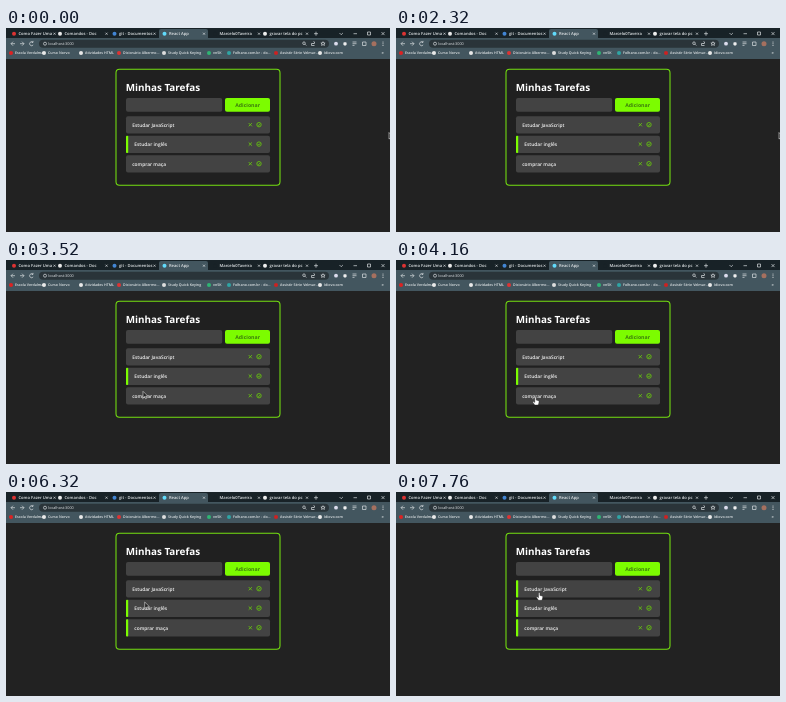
An HTML page that plays this animation: 384 by 204 pixels, repeating every 8 s.

```html
<!DOCTYPE html>
<html lang="pt-BR">
<head>
<meta charset="utf-8">
<title>Minhas Tarefas</title>
<style>
  html, body { margin: 0; width: 100%; height: 100%; overflow: hidden; background: #222; }
  svg { display: block; width: 100vw; height: 100vh; }
  text { font: 600 4.1px "Open Sans", "Noto Sans", sans-serif; fill: #e2e6e8; text-rendering: geometricPrecision; white-space: pre; }
  .url { font-size: 3.8px; font-weight: 400; }
  .bookmark { font-size: 3.6px; }
  .title { font-size: 9.9px; font-weight: 700; fill: #fff; }
  .button { font-size: 5.2px; font-weight: 700; fill: #3d7d0d; text-anchor: middle; }
  .task { font-size: 4.85px; fill: #f4f4f4; }
  .line { fill: none; stroke: #d8dde0; stroke-width: .7; }
  .lime { fill: none; stroke: #66c010; stroke-width: .9; }
  .arrow { fill: #222; stroke: #ddd; stroke-width: .6; }
  .hand { fill: #fff; stroke: #222; stroke-width: .4; stroke-linejoin: round; }
</style>
</head>
<body>
<svg id="stage" viewBox="0 0 384 204"></svg>
<script>
const LIME = '#7cfc00', TOOLBAR = '#43565f';
const stage = document.getElementById('stage');

const rect = (x, y, w, h, fill, r = 0, extra = '') =>
  `<rect x="${x}" y="${y}" width="${w}" height="${h}" rx="${r}" fill="${fill}" ${extra}/>`;
const dot = (x, y, r, fill) => `<circle cx="${x}" cy="${y}" r="${r}" fill="${fill}"/>`;
const label = (x, y, text, cls = '') => `<text x="${x}" y="${y}" class="${cls}">${text}</text>`;
const line = (d, cls = 'line') => `<path d="${d}" class="${cls}"/>`;
const cross = (x, y, r, cls) => line(`M${x - r} ${y - r}l${2 * r} ${2 * r}m0 ${-2 * r}l${-2 * r} ${2 * r}`, cls);

function browser() {
  const tabs = [
    [8, 'Como Fazer Uma', '#d33'], [54, 'Comandos - Doc', '#e8e8e8'], [108.5, 'git - Documentos', '#4285d4'],
    [158.5, 'React App', '#61dafb'], [209, 'Marcelo0Taveira', '#182227'], [259, 'gravar tela do pc', '#eee']
  ];
  const bookmarks = [
    [5, 'Escola Verdalma', '#d22'], [38, 'Curso Norvo', '#e8e8e8'], [75, 'Atividades HTML', '#e8e8e8'],
    [113, 'Dicionário Albermo...', '#d33'], [158, 'Study Quick Keying', '#ddd'], [203, 'vn5K', '#2fb573'],
    [223, 'Folhano.com.br - do...', '#2fa5a5'], [270, 'Assistir Série Velmar...', '#c22'], [314, 'Idiovo.com', '#e8e8e8']
  ];
  return rect(0, 0, 384, 11, '#182227') + rect(153, 1, 49, 11, TOOLBAR, 2) +
    rect(0, 10, 384, 21, TOOLBAR) + rect(33, 11.7, 290, 8, '#2a3439', 4) +
    tabs.map(([x, text, color]) => dot(x, 5.7, 2, color) + label(x + 4.5, 7.2, text)).join('') +
    [48.5, 100.5, 148.5, 198, 253, 301].map(x => cross(x, 5.7, 1)).join('') +
    line('M308 5.7h4m-2 -2v4M333.5 5l1.7 1.7l1.7 -1.7M347.5 5.7h3.5M361.5 4h3v3h-3z') + cross(377, 5.6, 1.5) +
    line('M9 15.7h-4m2 -2l-2 2l2 2M14 15.7h4m-2 -2l2 2l-2 2M27 14.3a2 2 0 1 0 .2 2.6m-.2 -4v1.5h-1.5') +
    `<circle cx="39" cy="15.7" r="1.5" class="line"/>` + label(42.2, 17.2, 'localhost:3000', 'url') +
    `<circle cx="298" cy="15.2" r="1.3" class="line"/>` + line('M299 16.2l1.3 1.3M308.5 15.5h-3v2h3m-1 -4l1.5 1l-1.5 1') +
    line('M317 13.7l.6 1.3h1.5l-1.1 1l.4 1.4l-1.4 -.8l-1.4 .8l.4 -1.4l-1.1 -1h1.5z') +
    dot(330, 15.7, 1.9, '#dde') + rect(337.4, 14.2, 3.2, 3.2, '#eee', .8) + line('M346.5 14h4m-4 1.7h4m-4 1.7h2') +
    line('M356.5 14h3.5v3.5h-3.5z') + dot(368, 15.7, 2.5, '#a5705f') +
    [13.9, 15.7, 17.5].map(y => dot(377, y, .5, '#eee')).join('') +
    bookmarks.map(([x, text, color]) => dot(x, 25, 2, color) + label(x + 4, 26.4, text, 'bookmark')).join('') +
    label(375.5, 26.2, '»');
}

function task(y, text, done) {
  const cy = y + 8.4;
  return rect(120, y, 144, 17.3, '#434343', 2) +
    (done ? rect(120, y, 2.2 * done, 17.3, LIME, .8) : '') +
    label(126.2 + 2.1 * done, y + 10.6, text, 'task') +
    cross(244.3, cy, 1.6, 'lime') +
    `<circle cx="253" cy="${cy}" r="2.2" class="lime"/>` +
    line(`M251.8 ${cy}l.9 .9l1.5 -1.7`, 'lime');
}

const card = rect(110, 41.2, 164, 116, '#202020', 3.5, 'stroke="#74e010" stroke-width="1.05"') +
  label(119.7, 63.1, 'Minhas Tarefas', 'title') +
  rect(120, 70, 96.2, 13.7, '#434343', 2) + rect(219, 70, 45, 13.7, LIME, 2) +
  label(241.6, 78.8, 'Adicionar', 'button');
const backdrop = rect(0, 0, 384, 204, '#222') + browser() + card;

// Pointer stops: time, x, y
const path = [
  [0, 383, 104.5], [2320, 383, 104.5], [2720, 255, 98], [3120, 137, 121], [3520, 137, 131.3],
  [3840, 139.5, 137], [5920, 139.5, 137], [6320, 138.7, 110], [6720, 143.2, 100.3], [8000, 143.2, 100.3]
];
const ARROW = 'M0 0v6.6l1.6 -1.4l1 2.3l1.1 -.5l-1 -2.2h2.1z';
const HAND = 'M-.7 .6q.7 -1 1.4 0v2.5l2.3 .6q.7 .3 .6 1l-.5 2.3l-.6 1h-3.2l-2 -2.8q0 -.9 .8 -.6l1.2 .8z';

const clamp = v => Math.max(0, Math.min(1, v));

function pointer(t) {
  const i = path.findIndex(stop => t < stop[0]);
  const [t0, x0, y0] = path[i - 1], [t1, x1, y1] = path[i];
  const k = (t - t0) / (t1 - t0), e = k * k * (3 - 2 * k);
  const resting = t >= 3840 && t < 5920 || t >= 6720;
  return `<g transform="translate(${x0 + (x1 - x0) * e} ${y0 + (y1 - y0) * e})">` +
    (resting ? line(HAND, 'hand') : line(ARROW, 'arrow')) + '</g>';
}

function draw(now) {
  const t = Math.floor(now % 8000 / 80) * 80;
  stage.innerHTML = backdrop +
    task(88.3, 'Estudar JavaScript', clamp((t - 7600) / 160)) +
    task(107.7, 'Estudar inglês', 1) +
    task(127.3, 'comprar maça', clamp((t - 4240) / 320)) +
    pointer(t);
  requestAnimationFrame(draw);
}
requestAnimationFrame(draw);
</script>
</body>
</html>
```
